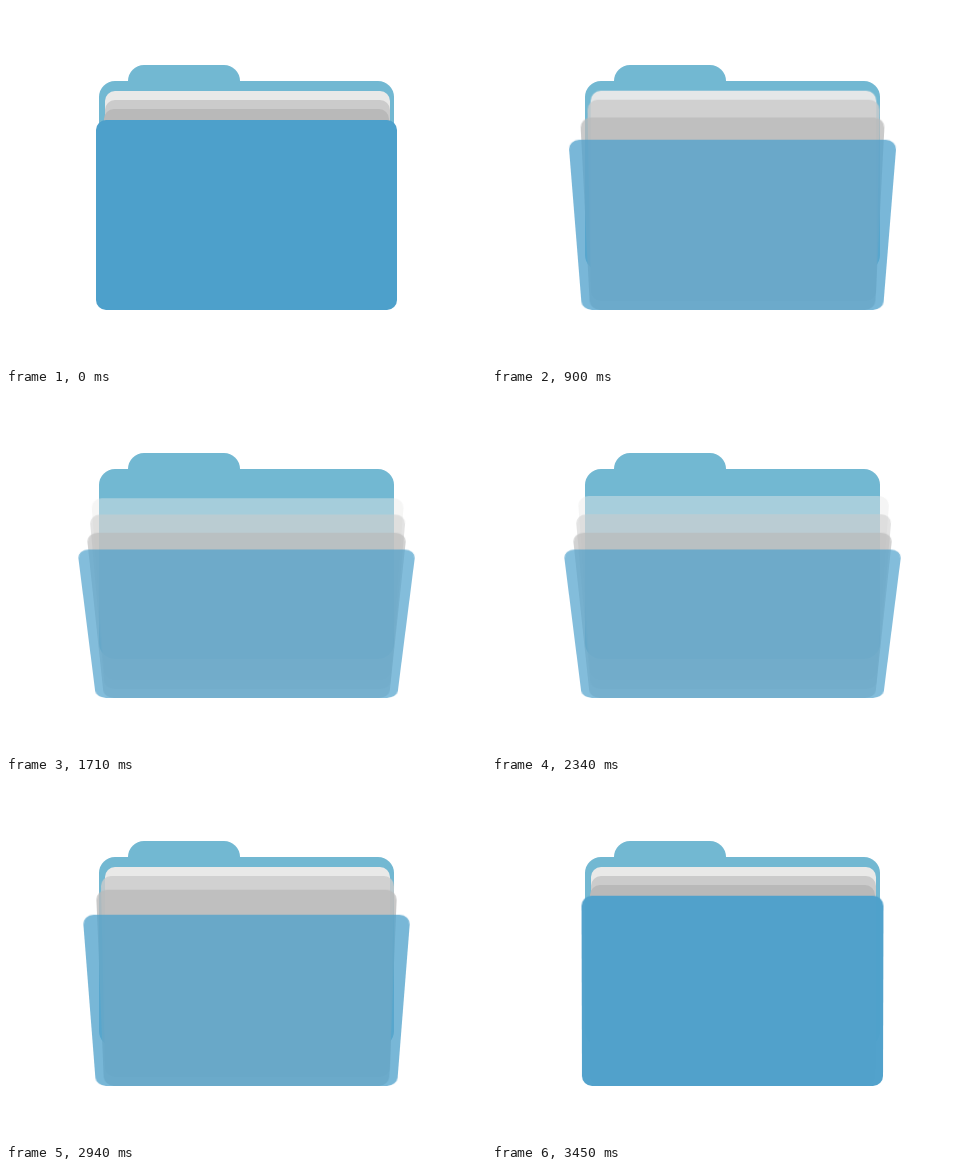
An HTML page that plays this animation: 480x360 px, repeating every 3.99 s.

```html
<!DOCTYPE html>
<html lang="en">
<head>
<meta charset="utf-8">
<title>Folder</title>
<style>
  html, body { margin: 0; width: 100%; height: 100%; overflow: hidden; background: #fff; }
  #stage {
    position: relative; width: 480px; height: 360px; overflow: hidden;
    perspective: 1100px; perspective-origin: 240px 181px;
  }
  #stage div { position: absolute; }
  .tab { left: 122px; top: 59px; width: 112px; height: 40px; border-radius: 16px 16px 0 0; background: #72b8d2; }
  .back { left: 92.5px; top: 74.5px; width: 295.5px; height: 190px; border-radius: 16px; background: #72b8d2; }
  .flap { border-radius: 10px; transform-origin: 50% 100%; }
</style>
</head>
<body>
<div id="stage">
  <div class="tab"></div>
  <div class="back"></div>
</div>
<script>
const LOOP = 3990, STEP = 30;
const OPEN_START = 360, OPEN_END = 1710, CLOSE_START = 2280, CLOSE_END = 3450;

// Sheets from rear to front, then the cover; angle and alpha apply when fully open.
const flaps = [
  { x: 99,   y: 85,  w: 285, h: 201, color: '#e9e9e8', angle: 30, alpha: .42, open: 794, close: 2230, closeTime: 640 },
  { x: 98.5, y: 94,  w: 285, h: 201, color: '#cbcbcb', angle: 33, alpha: .54, open: 560, close: 2305, closeTime: 1000 },
  { x: 98,   y: 103, w: 285, h: 201, color: '#b9b9b9', angle: 37, alpha: .64, open: 364, close: 2416, closeTime: 1000 },
  { x: 90, y: 114.3, w: 300.5, h: 189.7, color: '#4da0cb', angle: 40, alpha: .7, open: 264, close: 2565, closeTime: 1000 }
];

for (const f of flaps) {
  f.el = document.createElement('div');
  f.el.className = 'flap';
  Object.assign(f.el.style, {
    left: f.x + 'px', top: f.y + 'px', width: f.w + 'px', height: f.h + 'px', background: f.color
  });
  stage.append(f.el);
}

function ease(start, duration, t) {
  const u = Math.min(1, Math.max(0, (t - start) / duration));
  const a = u ** 1.74, b = (1 - u) ** 1.74;
  return a / (a + b);
}

// Resting times between the opening and closing moves.
function holdTime(t) {
  if (t < OPEN_START) return 0;
  if (t > OPEN_END && t < CLOSE_START) return OPEN_END;
  return Math.min(t, CLOSE_END);
}

function draw(now) {
  const t = holdTime(Math.floor(now % LOOP / STEP) * STEP);
  for (const f of flaps) {
    const p = ease(f.open, 1000, t) * (1 - ease(f.close, f.closeTime, t));
    f.el.style.transform = `rotateX(${-f.angle * p}deg)`;
    f.el.style.opacity = 1 - (1 - f.alpha) * p ** .7;
  }
}

const begin = performance.now();
function tick() {
  draw(performance.now() - begin);
  requestAnimationFrame(tick);
}
tick();
</script>
</body>
</html>
```
